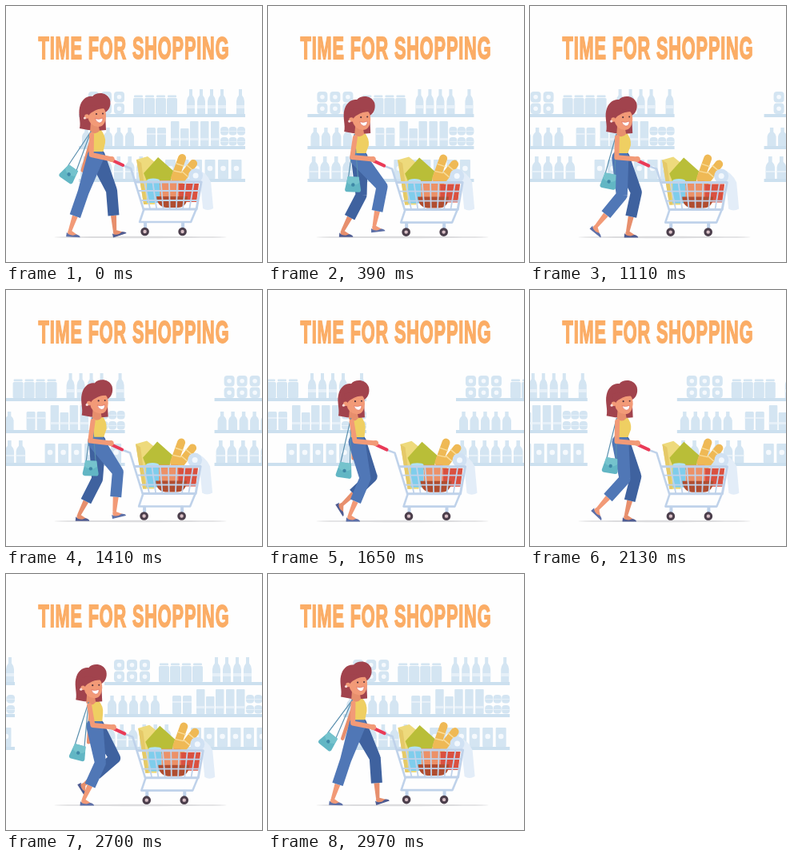
These frames come from a looping animation (320 px wide and 320 px high, 3 s). An HTML page:

```html
<!DOCTYPE html>
<html lang="en">
<head>
<meta charset="utf-8">
<title>Time for shopping</title>
<style>
  html, body { margin: 0; width: 100%; height: 100%; overflow: hidden; background: #fefefe; }
  svg { display: block; width: 100%; height: 100%; }
  .title { font: bold 38px "Liberation Sans", Arial, sans-serif; letter-spacing: 1.5px; fill: #fbad66; stroke: #fbad66; stroke-width: 1.8; }
  .line { fill: none; stroke-linecap: round; stroke-linejoin: round; }
</style>
</head>
<body>
<svg viewBox="0 0 320 320">
  <defs><g id="shelf"></g></defs>
  <g id="aisle">
    <use href="#shelf" x="91"/>
    <use href="#shelf" x="411"/>
  </g>
  <text class="title" text-anchor="middle" transform="translate(160 66.2) scale(.571 1)">TIME FOR SHOPPING</text>
  <ellipse cx="168" cy="289" rx="108" ry="1.2" fill="#dcdcde"/>

  <path id="farArm" class="line" stroke="#e78f6d" stroke-width="4.5"/>
  <g id="farLeg"></g>
  <g id="nearLeg"></g>
  <path id="torso" fill="#efcf62"/>
  <g id="head">
    <path d="M92 153C94 145 90 136 92 127C94 117 101 112 108 113C113 107 126 107 130 117C132 125 128 131 124 133L125 155Q108 157 92 153Z" fill="#a1434d"/>
    <path d="M106 145H115L117 156Q112 162 105 157Z" fill="#e78f6d"/>
    <path d="M102 132Q112 128 122 128Q125 131 125 138Q124 151 115 151Q104 150 102 138Z" fill="#f29a77"/>
    <path d="M99 126Q109 122 123 128Q115 128 109 132Q104 134 102 140Z" fill="#a1434d"/>
    <circle cx="101" cy="138" r="2.800" fill="#f29a77"/>
    <circle cx="98.500" cy="140" r="1.600" fill="#f7dcd8"/>
    <path d="M111.500 140.500Q116 142.500 121 140Q121 146 116.500 146Q112.500 145 111.500 140.500Z" fill="#fff" stroke="#dc6259" stroke-width=".6"/>
    <circle cx="113" cy="135" r="1.100" fill="#50333f"/>
    <circle cx="121" cy="134.500" r="1" fill="#50333f"/>
  </g>
  <g id="bag">
    <path id="strap" class="line" stroke="#5a8fae" stroke-width="1.200"/>
    <g id="purse">
      <path d="M-7 -9H7L10 7Q10 10 7 10H-7Q-10 10 -10 7Z" fill="#62b6c4"/>
      <path d="M-7 -9H7L8 -2Q0 5 -8 -2Z" fill="#75c3cd"/>
      <circle cy="1" r="2.200" fill="#3e87a6"/>
    </g>
  </g>

  <g id="cart">
    <path d="M163 192L177 188L187 196L186 248H172Z" fill="#eeda7c"/>
    <path d="M163 192L169 196L176 248H172Z" fill="#e5c968"/>
    <path d="M172 209L190 189L209 206L204 224H178Z" fill="#b9be38"/>
    <g class="line" stroke="#efb955" stroke-width="10">
      <path d="M211 215L220 190M217 219L234 197"/>
      <path d="M210 206L219 208M213 197L222 200M220 207L227 213M226 199L233 205" stroke="#f9dc98" stroke-width="1.500"/>
    </g>
    <path d="M192 218H216V242H192Z" fill="#ec9168"/>
    <path d="M216 222H241L238 245H216Z" fill="#da5140"/>
    <path d="M176 218H192V246H176Z" fill="#7fcdec"/>
    <ellipse cx="184" cy="218" rx="8" ry="2.500" fill="#b0e1f4"/>
    <path d="M188 238H227Q226 252 214 252H200Q189 251 188 238Z" fill="#b04d30"/>
    <path d="M238 204Q250 207 256 220L259 253Q252 257 246 253L243 222Z" fill="#e3edf8"/>
    <circle cx="237" cy="212" r="9" fill="#d0e1f3"/>
    <circle cx="237" cy="212" r="3.500" fill="#f3f8fd"/>
    <g class="line" stroke="#bfd2ea" stroke-width="2.600">
      <path d="M148 200L156 203L172 255L167 270H231L238 253"/>
      <path d="M162 220H244L238 254H172" stroke-width="3"/>
      <path d="M166 231H242M169 243H240" stroke-width="1.800"/>
      <path id="bars" stroke-width="1.800"/>
      <path d="M174 271V279M221 271V279" stroke-width="4"/>
    </g>
    <g fill="#4c3f4c"><circle cx="173.500" cy="282" r="5.300"/><circle cx="220.500" cy="282" r="5.300"/></g>
    <g fill="#d9bfc6"><circle cx="173.500" cy="282" r="2.200"/><circle cx="220.500" cy="282" r="2.200"/></g>
    <path class="line" d="M133 193L146 199" stroke="#ea3a57" stroke-width="4"/>
  </g>
  <path id="nearArm" class="line" stroke="#f29a77" stroke-width="6"/>
  <circle id="hand" r="3.600" fill="#f29a77"/>
</svg>
<script>
const LOOP = 3000, STEP = 30, CYCLE = 1000, SPACING = 320;
const THIGH = 46.500, SHIN = 50.500;
const $ = id => document.getElementById(id);
const set = (id, name, value) => $(id).setAttribute(name, value);
const range = n => [...Array(n).keys()];

function stockShelf() {
  const goods = '#d4e5f2', paper = '#e6f0f8';
  const rect = (x, y, w, h, r = 1.5, fill = goods) =>
    `<rect x="${x}" y="${y}" width="${w}" height="${h}" rx="${r}" fill="${fill}"/>`;
  const dot = (x, y, r) => `<circle cx="${x}" cy="${y}" r="${r}" fill="#f5f9fd"/>`;
  const bottle = (x, base, w, h) => {
    const m = x + w / 2, n = w * .2, top = base - h;
    return `<path fill="${goods}" d="M${m - n} ${top}H${m + n}V${top + h * .24}Q${x + w} ${top + h * .36} ${x + w} ${top + h * .48}V${base}H${x}V${top + h * .48}Q${x} ${top + h * .36} ${m - n} ${top + h * .24}Z"/>`;
  };
  const label = (x, y, w, h) => rect(x, y, w, h, 0, paper);
  let art = '';
  for (const i of range(3)) for (const y of [107, 121.500])
    art += rect(12 + 16 * i, y, 13, 13.500, 4) + dot(18.500 + 16 * i, y + 6.700, 2.800);
  for (const i of range(4)) {
    const x = 68 + 14 * i;
    art += rect(x, 115, 13, 20) + rect(x + 1, 111.500, 11, 2.700, 1);
  }
  for (const x of [135, 148, 161, 174, 197])
    art += bottle(x, 135, 10, 31) + label(x, 124, 10, 4);
  for (const i of range(5)) art += bottle(4 + 13.500 * i, 175, 11, 23);
  for (const x of [85, 98]) art += rect(x, 152, 11, 23) + label(x, 159, 11, 2);
  for (const [x, h] of [[115, 31], [127, 22], [139, 31], [152, 31], [165, 31]])
    art += rect(x, 175 - h, 10.500, h, 1) + label(x, 165, 10.500, 3);
  for (const i of range(3)) for (const y of [151, 164])
    art += rect(177 + 10.500 * i, y, 10, 10.500, 4) + label(177 + 10.500 * i, y + 5, 10, 1);
  for (const i of range(6)) art += bottle(2 + 14 * i, 216, 11.500, 28) + label(2 + 14 * i, 206, 11.500, 2);
  for (const i of range(6))
    art += rect(108 + 16.500 * i, 192, 13, 24, 1) + dot(114.500 + 16.500 * i, 203, 3.300);
  for (const y of [135, 175, 216]) art += rect(0, y, 208, 4, 0, '#cce0ef');
  $('shelf').innerHTML = art;
}

// Foot keys: phase, ankle x, ankle y, foot angle
const nearFoot = [[0, 80, 281, 3], [.12, 83, 275, 42], [.2, 96, 264, 55], [.3, 120, 264, 30],
  [.42, 137, 279, -18], [.5, 125, 282, 0], [.65, 102, 282, 0], [.75, 92, 282, 0], [.9, 83, 282, 0]];
const farFoot = [[0, 136, 281, -18], [.06, 128, 282, 0], [.12, 121, 282, 0], [.5, 82, 281, 0],
  [.58, 84, 273, 40], [.65, 93, 268, 58], [.7, 98, 263, 58], [.75, 111, 261, 55],
  [.86, 130, 268, 15], [.95, 138, 280, -18]];
// Bag keys: phase, strap angle, sag
const bagSwing = [[0, 27, 0], [.06, 16, 0], [.12, 7.500, 0], [.3, 1, 2], [.5, 2, 5], [.65, 7, 6], [.75, 16, 3], [.87, 27, 0], [.97, 30, 0]];

function sample(keys, p) {
  const i = keys.findLastIndex(k => k[0] <= p);
  const a = keys[i], b = keys[i + 1] || [1, ...keys[0].slice(1)];
  const f = (p - a[0]) / (b[0] - a[0]);
  return a.slice(1).map((v, j) => v + (b[j + 1] - v) * f);
}

// Middle joint of a two-part limb; side picks the bend direction
function joint([ax, ay], [bx, by], l1, l2, side) {
  const d = Math.hypot(bx - ax, by - ay), ux = (bx - ax) / d, uy = (by - ay) / d;
  const along = (l1 * l1 - l2 * l2 + d * d) / (2 * d);
  const off = side * Math.sqrt(Math.max(0, l1 * l1 - along * along));
  return [ax + ux * along + uy * off, ay + uy * along - ux * off];
}

const disc = ([x, y], r) => `M${x - r} ${y}a${r} ${r} 0 1 0 ${2 * r} 0a${r} ${r} 0 1 0 ${-2 * r} 0Z`;
function taper([ax, ay], [bx, by], ra, rb) {
  const d = Math.hypot(bx - ax, by - ay), nx = -(by - ay) / d, ny = (bx - ax) / d;
  return `M${ax + nx * ra} ${ay + ny * ra}L${bx + nx * rb} ${by + ny * rb}L${bx - nx * rb} ${by - ny * rb}L${ax - nx * ra} ${ay - ny * ra}Z`;
}

function drawLeg(id, hip, [x, y, angle], jeans, skin, shoe) {
  const ankle = [x, y], knee = joint(hip, ankle, THIGH, SHIN, 1);
  const cuff = knee.map((v, i) => v + (ankle[i] - v) * .62);
  $(id).innerHTML = `
    <path d="${taper(cuff, ankle, 3.5, 2.2)}${disc(ankle, 2.2)}" fill="${skin}"/>
    <g transform="translate(${x} ${y}) rotate(${angle})">
      <path d="M-2.500 0H2.500L10 5L9 7H-3Z" fill="${skin}"/>
      <path d="M-4 2Q-2 5.500 4 5.500L8 4Q13 5 13 7.500H-4.500Z" fill="${shoe}"/>
    </g>
    <path d="${disc(hip, 10.5)}${taper(hip, knee, 10.5, 7)}${disc(knee, 7)}${taper(knee, cuff, 7, 7)}" fill="${jeans}"/>`;
}

function draw(t) {
  const p = t % CYCLE / CYCLE, turn = 2 * Math.PI * p;
  const dx = 5 * Math.sin(turn);
  const dy = 4.200 * (1 - Math.max(0, Math.cos(2 * turn)) ** 2);
  const cartX = .8 + 1.700 * Math.cos(2 * turn - 2);
  const hip = [112.500 + dx * .25, 188 + dy * .5];
  const sx = 107 + dx * .6, sy = 160 + dy * .8;
  const [swing, sag] = sample(bagSwing, p);

  set('aisle', 'transform', `translate(${-SPACING * t / LOOP} 0)`);
  set('cart', 'transform', `translate(${cartX} ${dy * .15})`);
  set('head', 'transform', `translate(${dx} ${dy})`);
  set('bag', 'transform', `translate(${sx - 1} ${sy - 3}) rotate(${swing})`);
  set('strap', 'd', `M0 0L-6 ${51 + sag}M0 0L6 ${51 + sag}`);
  set('purse', 'transform', `translate(0 ${59 + sag}) rotate(${swing * .3})`);

  const back = (swing * .8 - 8) * Math.PI / 180;
  set('farArm', 'd', `M${sx + 2} ${sy}L${sx - 48 * Math.sin(back)} ${sy + 47 * Math.cos(back)}`);
  const [hx, hy] = hip;
  drawLeg('farLeg', [hx + 1, hy], sample(farFoot, p), '#3f629f', '#e78f6d', '#4f5c92');
  drawLeg('nearLeg', [hx - .5, hy], sample(nearFoot, p), '#5077b6', '#f29a77', '#5d70a8');

  set('torso', 'd', `M${sx + 1} ${sy - 4}Q${sx + 6} ${sy} ${sx + 11} ${sy - 6}Q${sx + 18} ${sy + 2} ${sx + 17} ${sy + 11}L${hx + 9} ${hy - 6}H${hx - 8}Q${hx - 4} ${hy - 14} ${sx + 1} ${sy + 10}Z`);

  const shoulder = [sx, sy + 1], hand = [132 + cartX, 191.500];
  const elbow = joint(shoulder, hand, 25, 26, -1);
  set('nearArm', 'd', `M${shoulder}L${elbow}L${hand}`);
  set('hand', 'cx', hand[0]);
  set('hand', 'cy', hand[1]);
}

function tick() {
  const t = performance.now() % LOOP;
  draw(Math.floor(t / STEP) * STEP);
  requestAnimationFrame(tick);
}

stockShelf();
set('bars', 'd', range(7).map(i => `M${173 + 10.300 * i} 220L${180 + 8.200 * i} 254`).join(''));
draw(0);
requestAnimationFrame(tick);
</script>
</body>
</html>
```
